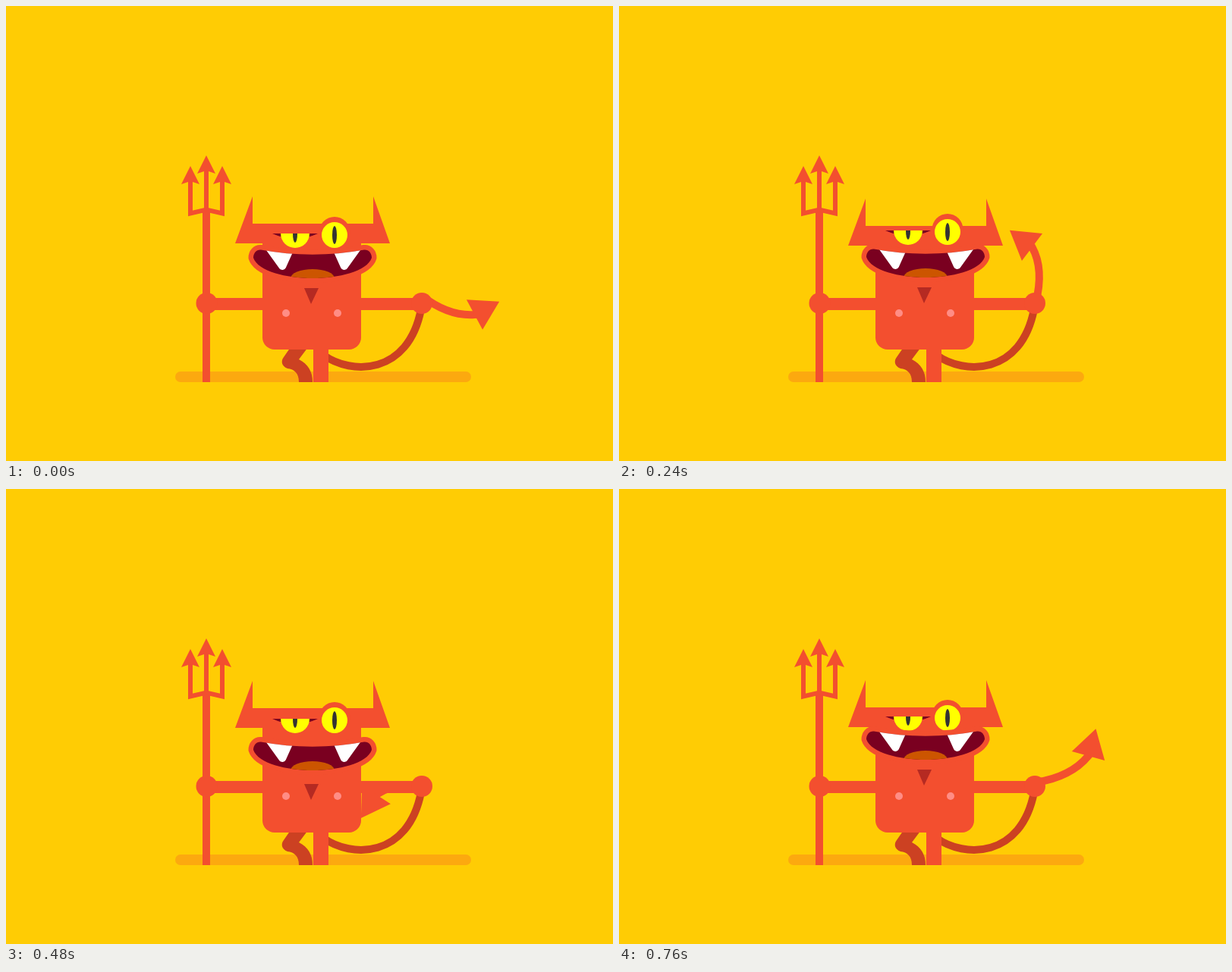
Recreate the animation shown at these times as an HTML page with a canvas. Size 800 px wide and 600 px high, loop 800 ms.

```html
<!DOCTYPE html>
<html lang="en">
<head>
<meta charset="utf-8">
<title>Little devil</title>
<style>
html, body { margin: 0; width: 100%; height: 100%; overflow: hidden; background: #ffcc04; }
canvas { display: block; }
</style>
</head>
<body>
<canvas id="stage" width="800" height="600"></canvas>
<script>
const ctx = document.getElementById('stage').getContext('2d');
const RED = '#f34f2f', DARK = '#cc4122';
const STEP = 40, CYCLE = 400;
const rad = deg => deg * Math.PI / 180;

// One tail swing: mouth, chin and eye drop, arrow base x and y, arrow angle, tail root y
const poses = [
  [0, 0, 0, 617.5, 407, -28, 383],
  [7, 9, 2, 556, 450, 36, 388],
  [12, 17, 3, 488, 403, 123, 392],
  [8, 11, 0, 491, 356, 162, 392],
  [4, 5, -2, 510.5, 329, 189.5, 392],
  [1, 2, -3, 527, 322, 203, 392],
  [-1, -1, -4, 544.5, 318, 217, 392],
  [-3, -2, -3.5, 563, 319, 232, 392],
  [-4, -3, -2, 581.5, 325.5, 248, 392],
  [-2, -2, 0, 618.5, 352, 285.6, 387]
];

function fill(color, path) {
  ctx.fillStyle = color;
  ctx.fill(path);
}
function shape(color, d) {
  fill(color, new Path2D(d));
}
function rect(color, x, y, w, h, radius = 0) {
  const p = new Path2D();
  p.roundRect(x, y, w, h, radius);
  fill(color, p);
}
function oval(color, x, y, rx, ry = rx, from = 0, to = Math.PI * 2) {
  const p = new Path2D();
  p.ellipse(x, y, rx, ry, 0, from, to);
  fill(color, p);
}
function line(color, width, d, join = 'miter') {
  ctx.strokeStyle = color;
  ctx.lineWidth = width;
  ctx.lineJoin = join;
  ctx.stroke(new Path2D(d));
}
function shifted(dy, draw) {
  ctx.save();
  ctx.translate(0, dy);
  draw();
  ctx.restore();
}

function drawPitchfork() {
  rect(RED, 259, 269, 10, 227);
  rect(RED, 261, 212, 6, 60);
  line(RED, 6, 'M243 230V273.5L264 268.5L285 273.5V230');
  for (const [x, y] of [[243, 211], [264, 197], [285, 211]]) {
    shape(RED, `M${x} ${y}l12 24l-12 -4l-12 4z`);
  }
}

function drawTail(x, y, angle, rootY) {
  const rootX = 549;
  const chord = Math.atan2(y - rootY, x - rootX);
  const reach = Math.hypot(x - rootX, y - rootY) * 0.35;
  const start = chord + rad(18), end = rad(angle + 24);
  const p = new Path2D();
  p.moveTo(rootX, rootY);
  p.bezierCurveTo(
    rootX + reach * Math.cos(start), rootY + reach * Math.sin(start),
    x - reach * Math.cos(end), y - reach * Math.sin(end), x, y);
  p.lineTo(x + 4 * Math.cos(end), y + 4 * Math.sin(end));
  ctx.strokeStyle = RED;
  ctx.lineWidth = 10;
  ctx.lineJoin = 'round';
  ctx.stroke(p);
  ctx.save();
  ctx.translate(x, y);
  ctx.rotate(rad(angle));
  shape(RED, 'M0 -22.5L37 0L0 22.5z');
  ctx.restore();
}

function drawBody() {
  rect(RED, 264, 385, 284, 16);
  oval(RED, 264.5, 392, 14);
  oval(RED, 548, 392, 14);
  rect(RED, 405, 445, 20, 51);
  rect(RED, 338, 300, 130, 153, [0, 0, 16, 16]);
  oval('#ff8d85', 369, 405, 5);
  oval('#ff8d85', 437, 405, 5);
}

function drawEyes() {
  oval(RED, 433, 298.5, 20.5);
  oval('#ffff00', 433, 302, 17);
  oval('#333333', 433, 302, 3, 12);
  shape('#7a0020', 'M351 300Q381 314 411 300z');
  oval('#ffff00', 381, 300, 19, 19, 0, Math.PI);
  oval('#333333', 381, 300, 3, 12, 0, Math.PI);
}

function drawTooth() {
  const p = new Path2D();
  p.moveTo(340.1, 318);
  p.arcTo(365.3, 353, 381, 318, 5);
  p.lineTo(381, 318);
  fill('#ffffff', p);
}

function drawMouth() {
  const d = 'M336 321.5Q404 334 472 321.5C478 321 482 326 482 332' +
    'C476 350 438 359 404 359C370 359 332 350 326 332C326 326 330 321 336 321.5z';
  line(RED, 13, d, 'round');
  shape('#7a0020', d);
  ctx.clip(new Path2D(d));
  oval('#cc5500', 404, 359, 29, 12);
  drawTooth();
  ctx.translate(810, 0);
  ctx.scale(-1, 1);
  drawTooth();
}

function draw(time) {
  const index = Math.floor(time % CYCLE / STEP);
  const [mouth, chin, eyes, x, y, angle, rootY] = poses[index];
  const nod = Math.round(3 * Math.sin(Math.PI * index / poses.length));

  rect('#ffcc04', 0, 0, 800, 600);
  rect('#fca90f', 223, 482, 390, 14, 7);
  line(DARK, 10, 'M418 460C455 487 530 487 547 400');
  shape(DARK, 'M375 450H398L386 466C398 472 404 482 404 496H386' +
    'C386 484 380 479 371 478C363 475 362 468 366 463z');
  drawTail(x, y, angle, rootY);
  drawPitchfork();
  drawBody();
  shifted(chin, () => shape('#b52a22', 'M393 372H412L402 393z'));
  shifted(nod, () => shape(RED, 'M325 251V287H484V251L506 313H302z'));
  shifted(eyes, drawEyes);
  shifted(mouth, drawMouth);
}

function tick() {
  draw(performance.now());
  requestAnimationFrame(tick);
}
tick();
</script>
</body>
</html>
```
